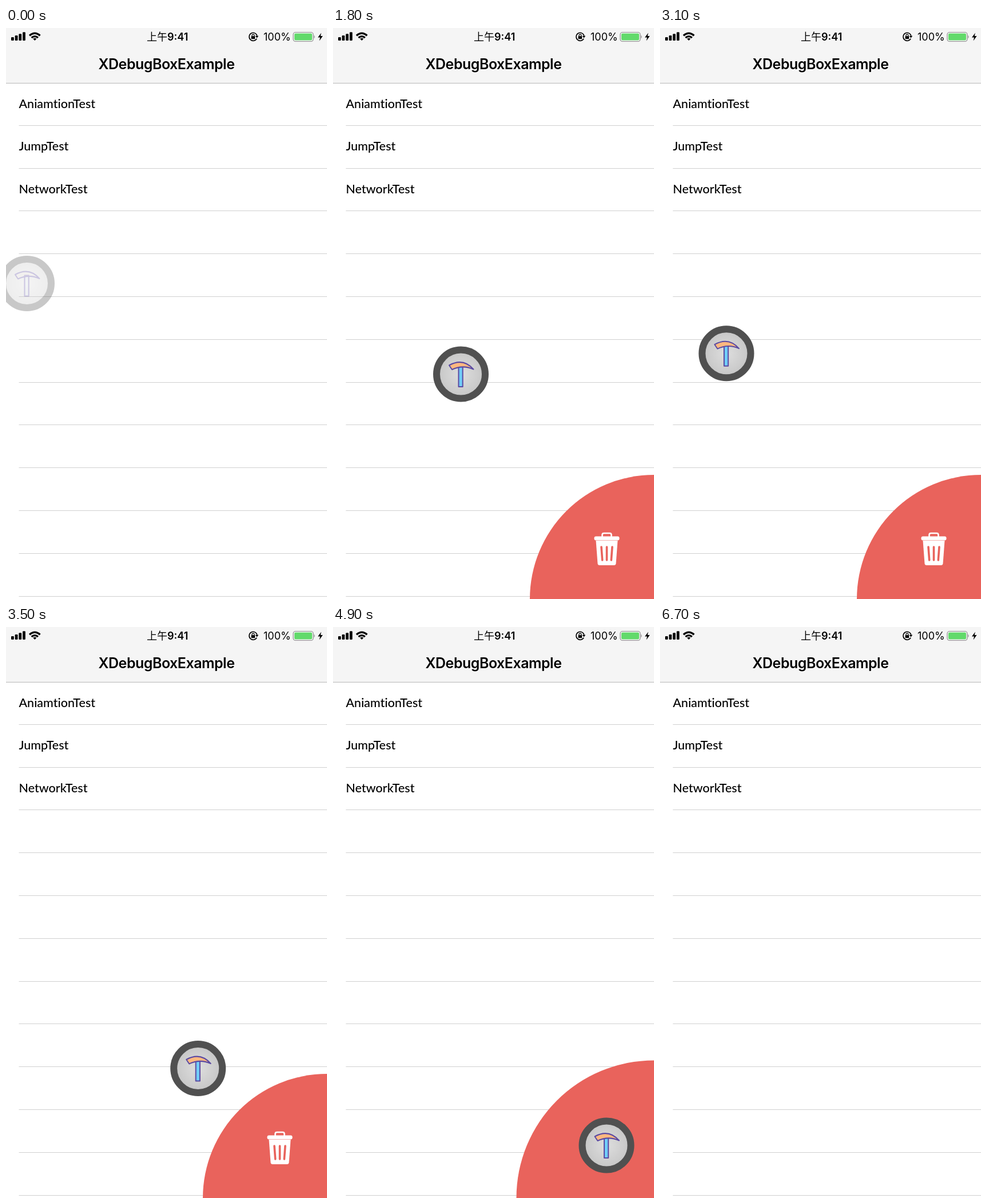
These frames come from a looping animation (561x998 px, 7 s). An HTML page:

```html
<!DOCTYPE html>
<html lang="zh">
<head>
<meta charset="utf-8">
<title>XDebugBoxExample</title>
<style>
  html, body { margin: 0; width: 100%; height: 100%; overflow: hidden; background: #fff; }
  svg { display: block; width: 100vw; height: 100vh; }
  .status { font: 400 18px Inter, "Noto Sans CJK SC", "Noto Sans CJK", sans-serif; }
  .title { font: 600 25px Inter, sans-serif; letter-spacing: -.5px; text-anchor: middle; }
  .cell { font: 500 21.5px Lato, sans-serif; font-variant-ligatures: none; }
</style>
</head>
<body>
<svg viewBox="0 0 561 998">
  <defs>
    <radialGradient id="face">
      <stop offset="0" stop-color="#dedede"/>
      <stop offset="1" stop-color="#c5c5c5"/>
    </radialGradient>
  </defs>
  <rect width="561" height="998" fill="#fff"/>
  <g id="rows"></g>

  <rect width="561" height="96" fill="#f5f5f5"/>
  <rect y="96" width="561" height="1" fill="#b8b8b8"/>
  <text class="title" x="281.5" y="73" fill="#fff">XDebugBoxExample</text>
  <text class="title" x="280.5" y="72">XDebugBoxExample</text>

  <g id="signal"></g>
  <g fill="none" stroke="#000" stroke-width="3.2">
    <path d="M41 13.2Q50.3 5 59.6 13.2"/>
    <path d="M44.6 17Q50.3 12.2 56 17"/>
    <path d="M47.2 18.8Q50.3 16.6 53.4 18.8L50.3 22Z" fill="#000" stroke="none"/>
  </g>
  <text class="status" x="246" y="22">上午<tspan font-weight="600">9:41</tspan></text>
  <g fill="none" stroke="#000" stroke-width="1.6">
    <path d="M438.2 18.6A7 7 0 1 1 438.8 13.6"/>
    <path d="M435.6 13.8H441.4L438.5 17.4Z" fill="#000" stroke="none"/>
    <rect x="428.6" y="14.2" width="6.6" height="5" fill="#000" stroke="none"/>
    <path d="M430 14.5V12.8A1.9 1.9 0 0 1 433.8 12.8V14.5" stroke-width="1.2"/>
  </g>
  <text class="status" x="450" y="22">100%</text>
  <rect x="502" y="7.5" width="35" height="16" rx="4" fill="none" stroke="#8c8c8c" stroke-width="1.2"/>
  <rect x="504" y="9.5" width="31" height="12" rx="2" fill="#62da6b"/>
  <path d="M538.4 12.5Q541 15.5 538.4 18.5Z" fill="#8c8c8c"/>
  <path d="M551 8.5L545 16.4H549L547.6 22.5L553.6 14H549.7Z"/>

  <g id="bin">
    <circle id="disc" cx="561" cy="998" r="217" fill="#e9635c"/>
    <path d="M459.5 896H497.5L494.5 936Q494.2 939 491 939H466Q462.8 939 462.5 936Z" fill="#fff"/>
    <path d="M469 907L470.7 930M478.5 907V930M488 907L486.3 930" stroke="#e9635c" stroke-width="3.6" stroke-linecap="round"/>
    <g id="lid">
      <rect x="456.5" y="888.5" width="44" height="7" rx="3" fill="#fff"/>
      <path d="M470.5 889V886Q470.5 883 473.5 883H483.5Q486.5 883 486.5 886V889" fill="none" stroke="#fff" stroke-width="2.6"/>
    </g>
  </g>

  <g id="ball">
    <circle r="42.5" fill="url(#face)"/>
    <circle r="42.5" fill="none" stroke="#505050" stroke-width="12"/>
    <g id="pick" stroke="#5b4aa2" stroke-width="2" stroke-linejoin="round">
      <rect x="-4" y="-14" width="7.2" height="36" fill="#70cdf8"/>
      <path d="M-20.5 -15.5Q4 -29 22 -8.5Q3 -17 -15.5 -8Z" fill="#fdb880"/>
    </g>
  </g>
</svg>
<script>
const LOOP = 7000, STEP = 100;
const $ = id => document.getElementById(id);

$('signal').innerHTML = [0, 1, 2, 3].map(i =>
  `<rect x="${9 + i * 6.7}" y="${16 - i * 2.9}" width="4.8" height="${6 + i * 2.9}" rx="1.2"/>`).join('');

const labels = ['AniamtionTest', 'JumpTest', 'NetworkTest'];
$('rows').innerHTML = Array.from({ length: 12 }, (_, i) => {
  const bottom = 95.76 + 74.813 * (i + 1);
  return `<rect x="22.5" y="${Math.floor(bottom - .37)}" width="538.5" height="1" fill="#d0d0d0"/>` +
    `<text class="cell" x="22.5" y="${Math.round(bottom - 31)}">${labels[i] || ''}</text>`;
}).join('');

// Drag path: time, x, y
const drag = [
  [800, 36.5, 446.5], [1400, 214, 492], [1800, 223.5, 605], [2200, 168, 550],
  [2600, 101, 481], [3000, 78, 528], [3500, 335.7, 771.5], [3800, 352, 792],
  [4300, 436.8, 860.3], [4700, 478, 906]
];

const clamp = v => Math.min(1, Math.max(0, v));
const ramp = (t, from, to) => clamp((t - from) / (to - from));
const ease = p => p * p * (3 - 2 * p);

function slope(i, k) {
  const a = drag[i - 1], b = drag[i + 1];
  return a && b ? (b[k] - a[k]) / (b[0] - a[0]) : 0;
}

function along(t, k) {
  const last = drag.length - 1;
  if (t <= drag[0][0]) return drag[0][k];
  if (t >= drag[last][0]) return drag[last][k];
  const i = drag.findIndex(key => key[0] > t) - 1;
  const a = drag[i], b = drag[i + 1], span = b[0] - a[0];
  const p = (t - a[0]) / span, q = 1 - p;
  return a[k] * q * q * (1 + 2 * p) + b[k] * p * p * (3 - 2 * p) +
    span * p * q * (slope(i, k) * q - slope(i + 1, k) * p);
}

function draw(t) {
  const wake = ramp(t, 600, 900);
  const drop = ease(ramp(t, 5100, 5400));
  $('ball').setAttribute('transform',
    `translate(${along(t, 1)} ${along(t, 2)}) scale(${1 - .6 * drop})`);
  $('ball').setAttribute('opacity', (.31 + .69 * wake) * (1 - drop));
  $('pick').setAttribute('fill-opacity', .08 + .92 * wake);

  const hover = ease(ramp(t, 4300, 4600));
  const hidden = 1 - ease(ramp(t, 800, 1200)) + ramp(t, 5500, 5900) ** 2.5;
  const shift = 241 * hidden;
  $('bin').setAttribute('transform', `translate(${shift} ${shift})`);
  $('bin').setAttribute('visibility', hidden >= 1 ? 'hidden' : 'visible');
  $('disc').setAttribute('r', 217 + 23.5 * hover);
  $('lid').setAttribute('transform', `rotate(${12 * hover} 491 896)`);
}

const start = performance.now();
function tick() {
  const t = (performance.now() - start) % LOOP;
  draw(Math.floor(t / STEP) * STEP);
  requestAnimationFrame(tick);
}
draw(0);
requestAnimationFrame(tick);
</script>
</body>
</html>
```
